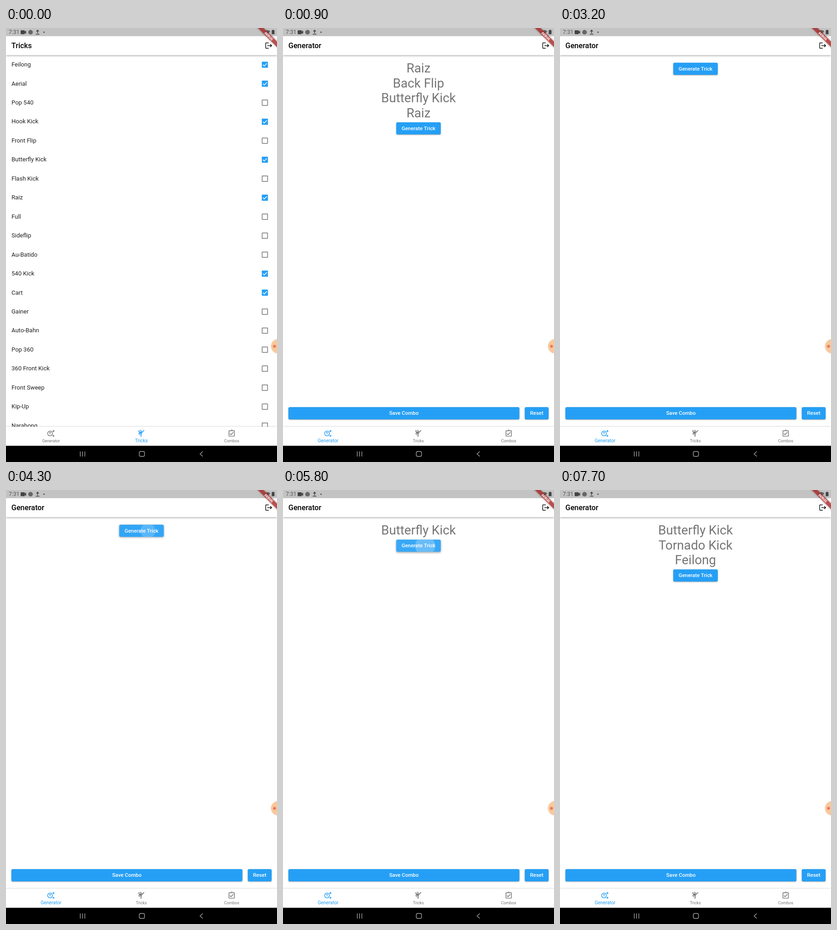
An HTML page for the animation above (8000 ms loop, 592 by 947 pixels).

```html
<!DOCTYPE html>
<html lang="en">
<head>
<meta charset="utf-8">
<style>
html, body { margin: 0; width: 100%; height: 100%; overflow: hidden; background: #fff; }
svg { display: block; }
text { font-family: Roboto, sans-serif; white-space: pre; }
.medium { font-weight: 500; }
.bar { filter: drop-shadow(0 1.5px 2px rgba(0,0,0,.4)); }
.nav { filter: drop-shadow(0 -.5px 1px rgba(0,0,0,.14)); }
.banner { filter: drop-shadow(0 0 2px rgba(0,0,0,.45)); }
</style>
</head>
<body>
<svg id="stage" width="592" height="947" viewBox="0 0 592 947"></svg>
<script>
const LOOP = 8000, STEP = 100, BLUE = [37, 159, 245], GREY = [117, 117, 117];
const SWITCH = 520; // moment the Generator tab is tapped
const rgb = c => `rgb(${c.map(Math.round)})`;
const blue = rgb(BLUE);
const clamp = x => Math.max(0, Math.min(1, x));
const mix = (a, b, p) => a + (b - a) * p;
const easeOut = x => 1 - (1 - clamp(x)) ** 2.3;

const tricks = ['Feilong', 'Aerial', 'Pop 540', 'Hook Kick', 'Front Flip', 'Butterfly Kick', 'Flash Kick',
  'Raiz', 'Full', 'Sideflip', 'Au-Batido', '540 Kick', 'Cart', 'Gainer', 'Auto-Bahn', 'Pop 360',
  '360 Front Kick', 'Front Sweep', 'Kip-Up', 'Narabong'];
const checked = new Set([0, 1, 3, 5, 7, 11, 12]);

const savedCombo = ['Raiz', 'Back Flip', 'Butterfly Kick', 'Raiz'];
const newCombo = [[5100, 'Butterfly Kick'], [6400, 'Tornado Kick'], [7700, 'Feilong']];
const comboAt = t => t < 2900 ? savedCombo : newCombo.filter(([at]) => t >= at).map(([, name]) => name);

const resetPress = { start: 2765, release: 2802, x: 553, y: 847 };
const generatePresses = [
  { start: 4240, release: 4400, x: 310, y: 89 },
  { start: 5701, release: 5785, x: 313, y: 122 },
  { start: 6930, release: 6995, x: 306, y: 154 }
];

const icons = {
  logout: 'M17 7l-1.41 1.41L18.17 11H8v2h10.17l-2.58 2.58L17 17l5-5zM4 5h8V3H4c-1.1 0-2 .9-2 2v14c0 1.1.9 2 2 2h8v-2H4z',
  Generator: 'M9 4a8 8 0 1 0 0 16a8 8 0 1 0 0-16zm0 14a6 6 0 1 1 0-12a6 6 0 1 1 0 12zm3-9.5H6V10h2.25v5h1.5v-5H12z' +
    'M20.25 3.75L23 5l-2.75 1.25L19 9l-1.25-2.75L15 5l2.75-1.25L19 1zm0 14L23 19l-2.75 1.25L19 23l-1.25-2.75L15 19l2.75-1.25L19 15z',
  Tricks: 'M19.8 2l-8.2 6.7-1.21-1.04 3.6-2.08L9.41 1 8 2.41l2.74 2.74L5 8.46l-1.19 4.29L6.27 17 8 16l-2.03-3.52.35-1.3L9.5 13l.5 9h2l.5-10L21 3.4z' +
    'M5 3a2 2 0 1 0 0 4a2 2 0 1 0 0-4z',
  Combos: 'M19 3h-4.18a3 3 0 0 0-5.64 0H5c-1.1 0-2 .9-2 2v14c0 1.1.9 2 2 2h14c1.1 0 2-.9 2-2V5c0-1.1-.9-2-2-2z' +
    'm-7-.25a.75.75 0 1 1 0 1.5a.75.75 0 1 1 0-1.5zM19 19H5V5h14zM18 9l-1.41-1.42L10 14.17l-2.59-2.57L6 13l4 4z'
};

const icon = (name, x, y, fill) =>
  `<path transform="translate(${x - 8.88} ${y - 8.88}) scale(.74)" fill="${fill}" fill-rule="evenodd" d="${icons[name]}"/>`;
// y is the middle of the capitals
const text = (s, x, y, size, fill, extra = '') =>
  `<text x="${x}" y="${y + size * .3555}" font-size="${size}" fill="${fill}" ${extra}>${s}</text>`;
const centred = 'text-anchor="middle"';

// Ink spreading from the touch point to the middle of a box
function ripple(t, { start, release, x, y }, box, target, colour, strength) {
  if (t < start || t > release + 375) return '';
  const grow = easeOut((t - release) / 225);
  const alpha = strength * clamp((t - start) / 75) * (1 - clamp((t - release - 225) / 150));
  const cx = mix(x, box.x + box.w / 2, grow) - box.x, cy = mix(y, box.y + box.h / 2, grow) - box.y;
  return `<svg x="${box.x}" y="${box.y}" width="${box.w}" height="${box.h}">
    <circle cx="${cx}" cy="${cy}" r="${target * mix(.3, 1, grow)}" fill="${colour}" fill-opacity="${alpha}"/></svg>`;
}

function button(t, label, x, y, w, presses = []) {
  const box = { x, y, w, h: 26.6 };
  const press = presses.find(p => t >= p.start && t <= p.release + 375);
  const held = press ? clamp((t - press.start) / 100) * (1 - clamp((t - press.release) / 200)) : 0;
  const rect = (fill, style = '') =>
    `<rect x="${x}" y="${y}" width="${w}" height="26.6" rx="3" fill="${fill}" style="${style}"/>`;
  const shadow = `filter:drop-shadow(0 ${mix(1, 2.5, held)}px ${mix(1, 2.5, held)}px rgba(0,0,0,.36))`;
  return rect(blue, shadow) + (press ? rect(`rgba(255,255,255,${.1 * held})`) +
    ripple(t, press, box, Math.hypot(w, 26.6) / 2 + 3.7, '#fff', .24) : '') +
    text(label, x + w / 2, y + 13.1, 11.4, '#fff', centred + ' class="medium"');
}

function checkbox(y, on) {
  return on
    ? `<rect x="558.8" y="${y - 6.7}" width="13.4" height="13.4" rx="1" fill="${blue}"/>
       <path d="M561.2 ${y}l2.9 2.9 5.8-5.8" fill="none" stroke="#fff" stroke-width="1.5"/>`
    : `<rect x="559.55" y="${y - 5.95}" width="11.9" height="11.9" rx=".6" fill="none" stroke="#757575" stroke-width="1.5"/>`;
}

const trickList = () => tricks.map((name, i) => {
  const y = 79.5 + 41.45 * i;
  return text(name, 12, y, 13.02, 'rgba(0,0,0,.87)') + checkbox(y + .6, checked.has(i));
}).join('');

function generator(t) {
  const combo = comboAt(t);
  return combo.map((name, i) => text(name, 296, 87.4 + 32.5 * i, 27.7, 'rgba(0,0,0,.54)', centred)).join('') +
    button(t, 'Generate Trick', 247.4, 75.7 + 32.5 * combo.length, 97.2, generatePresses) +
    button(t, 'Save Combo', 11.8, 827.3, 504.6) +
    button(t, 'Reset', 528.2, 827.3, 52, [resetPress]);
}

const appBar = title => `<rect class="bar" y="10" width="592" height="49.2" fill="#fff"/>` +
  text(title, 11.8, 38.4, 16.28, '#000', 'class="medium"') + icon('logout', 574, 38.4, '#111');

function navBar(t) {
  const p = clamp((t - SWITCH) / 200);
  const tab = (name, x, on) => {
    const colour = rgb(GREY.map((g, i) => mix(g, BLUE[i], on)));
    return icon(name, x, 884.7, colour) + text(name, x, 900.4, mix(8.9, 10.36, on), colour, centred);
  };
  const glow = t >= 600 ? .4 * (1 - clamp((t - SWITCH) / 200)) : 0;
  return `<rect class="nav" y="870" width="592" height="45" fill="#fff"/>` +
    `<svg y="870" width="592" height="42"><circle cx="98.5" cy="21" r="26" fill="#bcbcbc" fill-opacity="${glow}"/></svg>` +
    (t >= 600 ? ripple(t, { start: SWITCH - 80, release: SWITCH, x: 98, y: 890 },
      { x: 0, y: 870, w: 197, h: 42 }, 100, '#c8c8c8', .4) : '') +
    tab('Generator', 98.4, t < 600 ? 0 : p) + tab('Tricks', 295.7, t < 600 ? 1 : 1 - p) + tab('Combos', 493, 0);
}

const chrome = `
  <rect width="592" height="17.8" fill="#c3c3c3"/>
  ${text('7:31', 6, 9.2, 12, '#555')}
  <g fill="#444">
    <path d="M33 5h7q1 0 1 1v2l3-2.4v7.4l-3-2.4v2q0 1-1 1h-7q-1 0-1-1V6q0-1 1-1z"/>
    <circle cx="53.6" cy="9.2" r="5" fill="#666"/>
    <path d="M69 3.6l3.6 3.8h-2.8v4.4h-1.6V7.4h-2.8zM65 12.8h8v1.5h-8z"/>
    <circle cx="83" cy="9.2" r="1.4"/>
    <path d="M565.5 7q6-5 12 0l-6 7z" fill="#666"/>
    <path d="M582 4h3v1h1.5v8.5h-6V5h1.5z"/>
  </g>
  <g transform="translate(592 0) rotate(45)">
    <rect class="banner" x="-45" y="20.7" width="90" height="8.9" fill="rgb(183,28,28)" fill-opacity=".68"/>
    ${text('DEBUG', 0, 25.2, 7.2, '#fff', centred + ' font-weight="900"')}
  </g>
  <circle cx="594.5" cy="694.5" r="15.2" fill="#fbc898" style="filter:drop-shadow(0 0 1px rgba(120,70,30,.35))"/>
  <circle cx="586.6" cy="694.5" r="4" fill="#f5ad86"/>
  <circle cx="586.6" cy="694.5" r="2.6" fill="#e9705a"/>
  <rect y="911.6" width="592" height="36" fill="#000"/>
  <g fill="none" stroke="#a0a0a0" stroke-width="1.4">
    <path d="M162.3 924v11M167.3 924v11M172.3 924v11"/>
    <rect x="291.2" y="924" width="11.4" height="10.8" rx="3"/>
    <path d="M429.8 924l-5.8 5.4 5.8 5.4"/>
  </g>`;

const stage = document.getElementById('stage');
const began = performance.now();
let shown = -1;
function draw() {
  const t = Math.floor((performance.now() - began) % LOOP / STEP) * STEP;
  if (t !== shown) {
    shown = t;
    const listing = t < 600;
    stage.innerHTML = (listing ? trickList() : generator(t)) +
      appBar(listing ? 'Tricks' : 'Generator') + navBar(t) + chrome;
  }
  requestAnimationFrame(draw);
}
draw();
</script>
</body>
</html>
```
